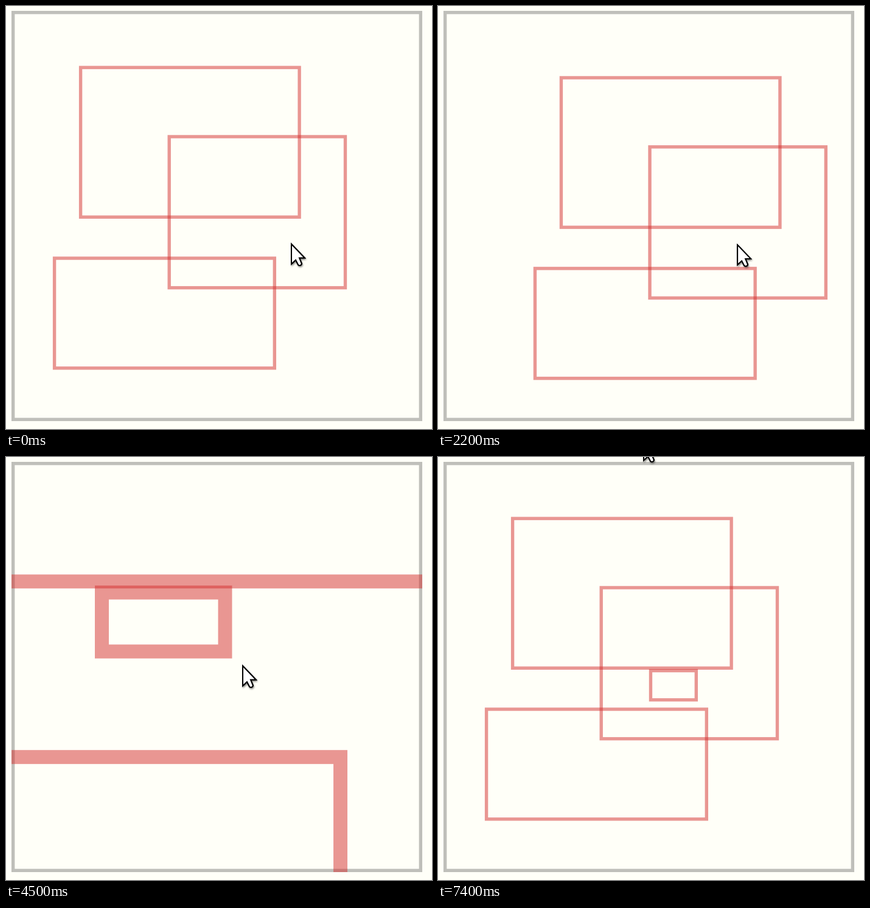
Recreate the animation shown at these times as an HTML page with a canvas. Size 700 by 696 pixels, loop 7.5 s.

```html
<!DOCTYPE html>
<html>
<head>
<meta charset="utf-8">
<title>Pan, zoom and draw</title>
<style>
  html, body { margin: 0; width: 100%; height: 100%; overflow: hidden; background: #fffff8; }
  canvas { display: block; }
</style>
</head>
<body>
<canvas id="stage" width="700" height="696"></canvas>
<script>
const ctx = document.getElementById('stage').getContext('2d');
const LOOP = 7500, STEP = 100, LINE = 5.38, NOTCH = 1.141;
const PAN = { from: 600, to: 2400 }, DRAW = { from: 4300, to: 5100 }, HOME = 6200;

// Centre lines at zoom 1: left, top, right, bottom
const rects = [
  [122.6, 101.2, 482.1, 347.3],
  [268.2, 215, 557.5, 463.6],
  [79.6, 415, 441.3, 595.8]
];

// Key points of the two drags: time, x, y
const panPath = [
  [500, 0, 0], [900, -65, -35], [1000, -84, -47], [1200, -130, -92], [1400, -145, 40],
  [1700, -27, 162.5], [1800, -1, 138.5], [2100, 80, 40], [2400, 61.5, -7.6]
];
const cornerPath = [[4300, 157.5, 223], [4500, 360, 320], [4600, 388, 342.5], [5100, 477, 428]];

// Pointer moves between the drags: start, end, x, y
const moves = [
  [0, 100, 423.5, 392.5], [2300, 2400, 483, 384.5], [3500, 3600, 495.2, 375],
  [4100, 4300, 157.5, 223], [5000, 5100, 476, 427], [5100, 5400, 473, 383],
  [6100, 6900, 332, 10], [6900, 7200, 334, -30], [7300, 7400, 337, -28.5]
];

// Wheel turns under the pointer: start, notches, ms between notches
const wheel = [[3000, 5, STEP], [3600, 6, STEP], [5600, -6, 0], [5800, -1, 0]];

const clamp = u => Math.min(1, Math.max(0, u));
const mix = (a, b, u) => a + (b - a) * u;

function along(path, t, smooth) {
  let i = 0;
  while (i < path.length - 2 && t >= path[i + 1][0]) i++;
  const [a, b] = [path[i], path[i + 1]];
  const span = b[0] - a[0], u = clamp((t - a[0]) / span);
  if (!smooth) return [1, 2].map(k => mix(a[k], b[k], u));

  const slope = (j, k) => path[j - 1] && path[j + 1]
    ? (path[j + 1][k] - path[j - 1][k]) / (path[j + 1][0] - path[j - 1][0]) : 0;
  return [1, 2].map(k => mix(a[k], b[k], u * u * (3 - 2 * u))
    + span * u * (1 - u) * (slope(i, k) * (1 - u) - slope(i + 1, k) * u));
}
const panAt = t => along(panPath, t, true);
const cornerAt = t => along(cornerPath, t);

// The pointer runs one step ahead of whatever it drags
function pointerAt(t) {
  if (t >= PAN.from && t < PAN.to) {
    const [x, y] = panAt(t + STEP);
    return [422.5 + x, 392.5 + y];
  }
  if (t >= DRAW.from && t < DRAW.to) return cornerAt(t + STEP);
  let [x, y] = [468, 390.5];
  for (const [start, end, toX, toY] of moves) {
    const u = clamp((t - start) / (end - start));
    [x, y] = [mix(x, toX, u), mix(y, toY, u)];
  }
  return [x, y];
}

function viewAt(t) {
  let zoom = 1, [x, y] = panAt(t);
  for (const [start, notches, gap] of wheel) {
    if (t < start) break;
    const turned = gap ? Math.min(notches, Math.floor((t - start) / gap) + 1) : notches;
    const ratio = NOTCH ** turned;
    const [px, py] = pointerAt(start);
    zoom *= ratio;
    x = mix(px + 1, x, ratio);
    y = mix(py, y, ratio);
  }
  if (t >= HOME) {
    // Zooming about the view's own fixed point leads back to the start
    const out = zoom / NOTCH ** Math.min(4, Math.floor((t - HOME) / STEP) + 1);
    const k = (out - 1) / (zoom - 1);
    [zoom, x, y] = [out, x * k, y * k];
  }
  return { zoom, x, y };
}

function drawnRect(t) {
  const { zoom, x, y } = viewAt(DRAW.from);
  const toWorld = ([px, py]) => [(px - x) / zoom, (py - y) / zoom];
  return [...toWorld(cornerAt(DRAW.from)), ...toWorld(cornerAt(t))];
}

const arrow = new Path2D('M1 1.3V34L8 27.5L11.8 34.8Q13.5 37.2 15.8 36.1Q18.5 34.8 17.5 32.5L14 24.1H22.8Z');

function drawPointer([x, y]) {
  ctx.save();
  ctx.translate(x, y);
  ctx.shadowColor = 'rgba(0,0,0,.4)';
  ctx.shadowBlur = 3;
  ctx.shadowOffsetX = 1;
  ctx.shadowOffsetY = 2;
  ctx.fillStyle = '#fff';
  ctx.fill(arrow);
  ctx.strokeStyle = '#000';
  ctx.lineWidth = 2;
  ctx.stroke(arrow);
  ctx.shadowColor = 'transparent';
  ctx.fill(arrow);
  ctx.stroke(arrow);
  ctx.restore();
}

function draw(t) {
  ctx.fillStyle = '#fffff8';
  ctx.fillRect(0, 0, 700, 696);
  ctx.lineWidth = LINE;
  ctx.strokeStyle = 'rgba(0,0,0,.25)';
  ctx.strokeRect(9 + LINE / 2, 8 + LINE / 2, 675 - LINE, 675 - LINE);

  const shapes = t > DRAW.from ? [...rects, drawnRect(t)] : rects;
  const { zoom, x, y } = viewAt(t);
  ctx.save();
  ctx.beginPath();
  ctx.rect(9, 8, 675, 675);
  ctx.clip();
  ctx.translate(x, y);
  ctx.scale(zoom, zoom);
  ctx.strokeStyle = 'rgba(211,47,47,.5)';
  for (const [left, top, right, bottom] of shapes) ctx.strokeRect(left, top, right - left, bottom - top);
  ctx.restore();

  drawPointer(pointerAt(t));
}

function frame() {
  const t = performance.now() % LOOP;
  draw(Math.floor(t / STEP) * STEP);
  requestAnimationFrame(frame);
}
frame();
</script>
</body>
</html>
```
